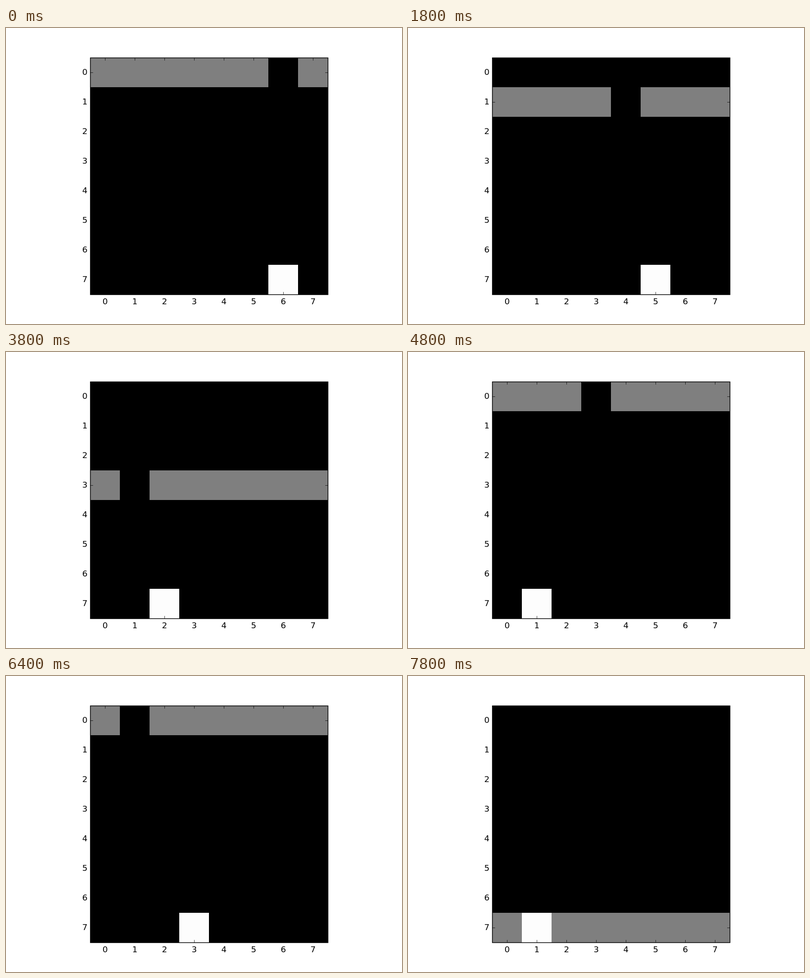
These frames come from a looping animation (800 px wide and 600 px high, 8 s). An HTML page:

```html
<!DOCTYPE html>
<html lang="en">
<head>
<meta charset="utf-8">
<title>Wall and gap grid</title>
<style>
  html, body { margin: 0; width: 100%; height: 100%; overflow: hidden; background: #fff; }
  svg { display: block; width: 800px; height: 600px; }
  text { font: 16.67px "DejaVu Sans", sans-serif; text-anchor: middle; }
  .cell { shape-rendering: crispEdges; }
  .wall { fill: #7f7f7f; }
  .player { fill: #fdfdfd; }
  .axes { fill: none; stroke: #000; stroke-width: 1.39; }
  .tick { stroke: #000; stroke-width: 0.7; }
</style>
</head>
<body>
<svg viewBox="0 0 800 600">
  <rect class="cell" x="170" y="60" width="480" height="480"/>
  <rect class="cell wall" id="wall" x="170" width="480" height="60"/>
  <rect class="cell" id="gap" width="60" height="60"/>
  <rect class="cell player" id="player" y="480" width="60" height="60"/>
  <rect class="axes" x="170.5" y="60.5" width="480" height="480"/>
  <g id="scale"></g>
</svg>
<script>
const LEFT = 170, TOP = 60, CELL = 60, COUNT = 8, STEP_MS = 200;
const gaps = [6, 4, 1, 3, 1];
// Player column at each step, one string per falling wall.
const playerColumns = ["66666666", "65444434", "43321111", "11111123", "33332111"].join("");

const byId = id => document.getElementById(id);
const wall = byId("wall"), gap = byId("gap"), player = byId("player");
const columnX = column => LEFT + column * CELL;
const rowY = row => TOP + row * CELL;

function drawScale() {
  const tick = d => `<path class="tick" d="${d}"/>`;
  const label = (x, y, n) => `<text x="${x}" y="${y}">${n}</text>`;
  let marks = "";
  for (let i = 0; i < COUNT; i++) {
    const x = columnX(i) + CELL / 2, y = rowY(i) + CELL / 2;
    marks += tick(`M${x + 0.5} 60.5v5.5M${x + 0.5} 540.5v-5.5`)
      + tick(`M170.5 ${y + 0.5}h5.5M650.5 ${y + 0.5}h-5.5`)
      + label(x + 0.3, 560, i) + label(159.3, y + 5, i);
  }
  byId("scale").innerHTML = marks;
}

function draw(now) {
  const step = Math.floor(now / STEP_MS) % playerColumns.length;
  const y = rowY(step % COUNT);
  wall.setAttribute("y", y);
  gap.setAttribute("y", y);
  gap.setAttribute("x", columnX(gaps[Math.floor(step / COUNT)]));
  player.setAttribute("x", columnX(+playerColumns[step]));
}

let start;
function tickFrame(now) {
  start ??= now;
  draw(now - start);
  requestAnimationFrame(tickFrame);
}

drawScale();
draw(0);
requestAnimationFrame(tickFrame);
</script>
</body>
</html>
```
